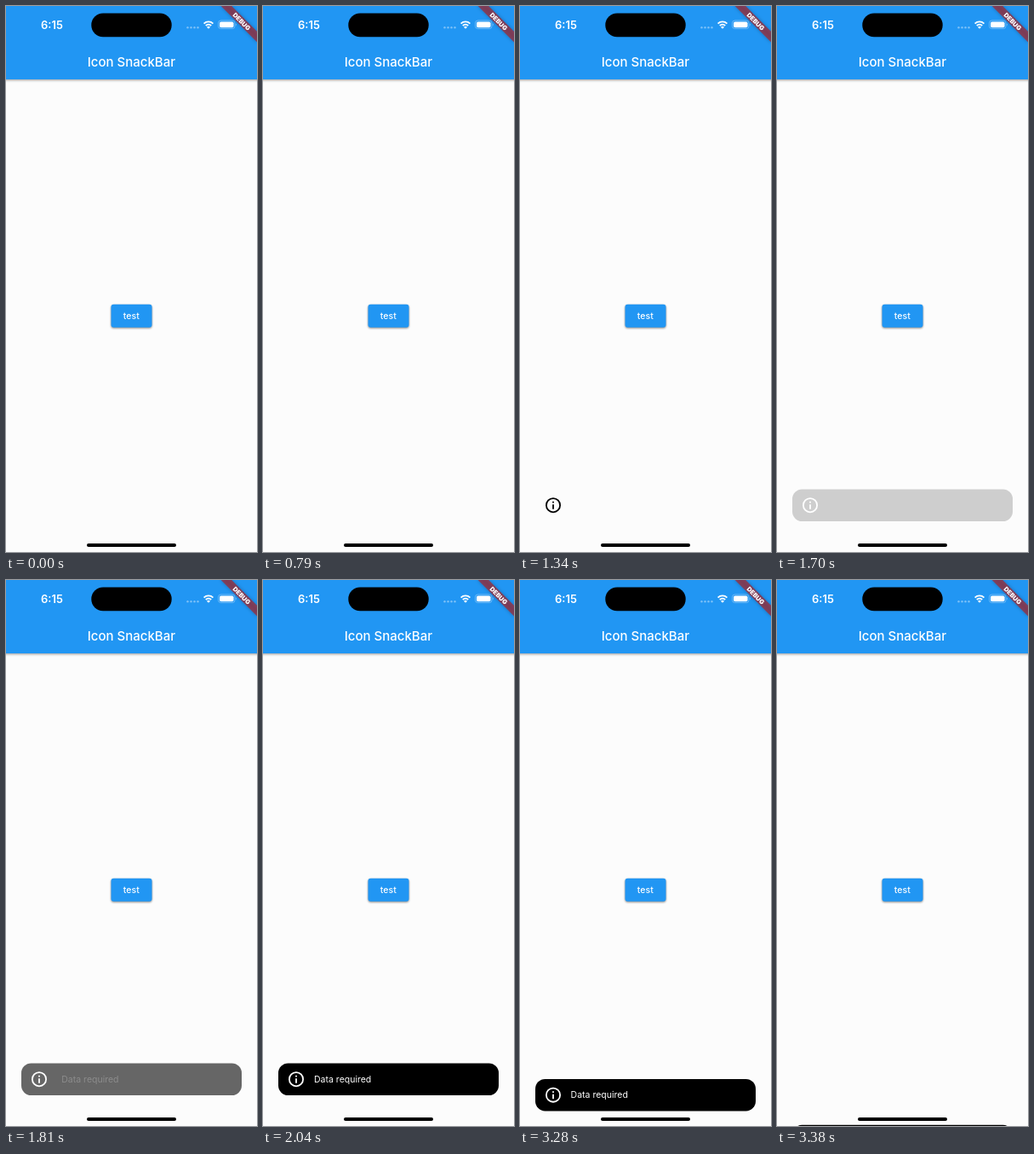
Write an HTML page that moves like this. It is 295 by 640 pixels and loops after 3490 ms.

```html
<!DOCTYPE html>
<html lang="en">
<head>
<meta charset="utf-8">
<title>Icon SnackBar</title>
<style>
  html, body { margin: 0; width: 100%; height: 100%; overflow: hidden; background: #fcfcfc; }
  svg { display: block; width: 295px; height: 640px; font-family: Inter, sans-serif; }
  .mid { text-anchor: middle; }
  .bar { filter: drop-shadow(0 1.5px 1.5px #0006); }
  .button { filter: drop-shadow(0 1px 1px #0007); }
  .banner { filter: drop-shadow(0 0 2px #0006); }
</style>
</head>
<body>
<svg viewBox="0 0 295 640">
  <rect class="bar" x="-5" y="-5" width="305" height="91" fill="#2196f3"/>
  <rect x="100.3" y="8.5" width="94.4" height="27.7" rx="13.8"/>

  <g fill="#fff">
    <text x="54" y="26.7" class="mid" font-size="13" font-weight="600">6:15</text>
    <g opacity=".4">
      <circle cx="213.5" cy="25.3" r="1.2"/>
      <circle cx="217.5" cy="25.3" r="1.2"/>
      <circle cx="221.5" cy="25.3" r="1.2"/>
      <circle cx="225.5" cy="25.3" r="1.2"/>
    </g>
    <g fill="none" stroke="#fff" stroke-width="1.8">
      <path d="M232.6 20.6a7.7 7.7 0 0 1 10.8 0M234.8 23a4.6 4.6 0 0 1 6.4 0"/>
    </g>
    <path d="M238 26.8l-2-2a2.8 2.8 0 0 1 4 0z"/>
    <rect x="249.5" y="17" width="19.5" height="9.6" rx="3" fill="none" stroke="#fff" stroke-opacity=".4" stroke-width=".8"/>
    <rect x="251" y="18.4" width="16.5" height="6.8" rx="1.8"/>
    <path d="M270 20.2q1.6 1.6 0 3.2z" opacity=".5"/>
    <text x="147.4" y="70.8" class="mid" font-size="15" font-weight="500">Icon SnackBar</text>
  </g>

  <g transform="translate(295 0) rotate(45)">
    <rect class="banner" x="-30" y="21" width="60" height="9" fill="#b71c1c" fill-opacity=".63"/>
    <text y="28.3" class="mid" font-size="7.4" font-weight="900" fill="#fff">DEBUG</text>
  </g>

  <rect class="button" x="123.5" y="349.7" width="48" height="27" rx="3" fill="#2196f3"/>
  <text x="147.4" y="366.9" class="mid" font-size="10.5" font-weight="500" letter-spacing=".1" fill="#fff">test</text>

  <g id="snack">
    <rect id="panel" x="18" y="566.5" width="259" height="37.5" rx="11.5"/>
    <g id="icon">
      <circle r="9" fill="none" stroke="currentColor" stroke-width="2"/>
      <path fill="currentColor" d="M-1-5h2v2h-2zM-1-1h2v6h-2z"/>
    </g>
    <text id="label" y="588.8" font-size="10.5" fill="#fff">Data required</text>
  </g>

  <rect x="95" y="630" width="105" height="4" rx="2"/>
</svg>
<script>
const LOOP = 3490;
const STEPS = [0, 790, 900, 1010, 1120, 1240, 1340, 1700, 1810, 1930, 2040, 3160, 3280, 3380];
const [snack, panel, icon, label] = ['snack', 'panel', 'icon', 'label'].map(id => document.getElementById(id));

const ramp = (t, start, length) => Math.min(1, Math.max(0, (t - start) / length));

// cubic-bezier(.4, 0, .2, 1), solved by bisection
function fastOutSlowIn(x) {
  let lo = 0, hi = 1, s = x;
  for (let i = 0; i < 24; i++) {
    s = (lo + hi) / 2;
    const bx = 1.2 * s * (1 - s) ** 2 + 0.6 * s * s * (1 - s) + s ** 3;
    if (bx < x) lo = s; else hi = s;
  }
  return s * s * (3 - 2 * s);
}

function draw(t) {
  const grow = 1 - (1 - ramp(t, 900, 400)) ** 3;
  const drop = 73.5 * (1 - fastOutSlowIn(1 - ramp(t, 3150, 250)));

  snack.setAttribute('transform', `translate(0 ${drop})`);
  panel.setAttribute('opacity', ramp(t, 1650, 270));
  icon.setAttribute('transform', `translate(39 585.2) scale(${0.9 * grow})`);
  icon.setAttribute('color', t < 1700 ? '#000' : '#fff');
  label.setAttribute('x', 59.6 + 7.3 * (1 - ramp(t, 1740, 320)));
  label.setAttribute('opacity', ramp(t, 1740, 290));
}

const start = performance.now();
function tick() {
  const t = (performance.now() - start) % LOOP;
  draw(STEPS.findLast(s => s <= t) ?? 0);
  requestAnimationFrame(tick);
}
tick();
</script>
</body>
</html>
```
